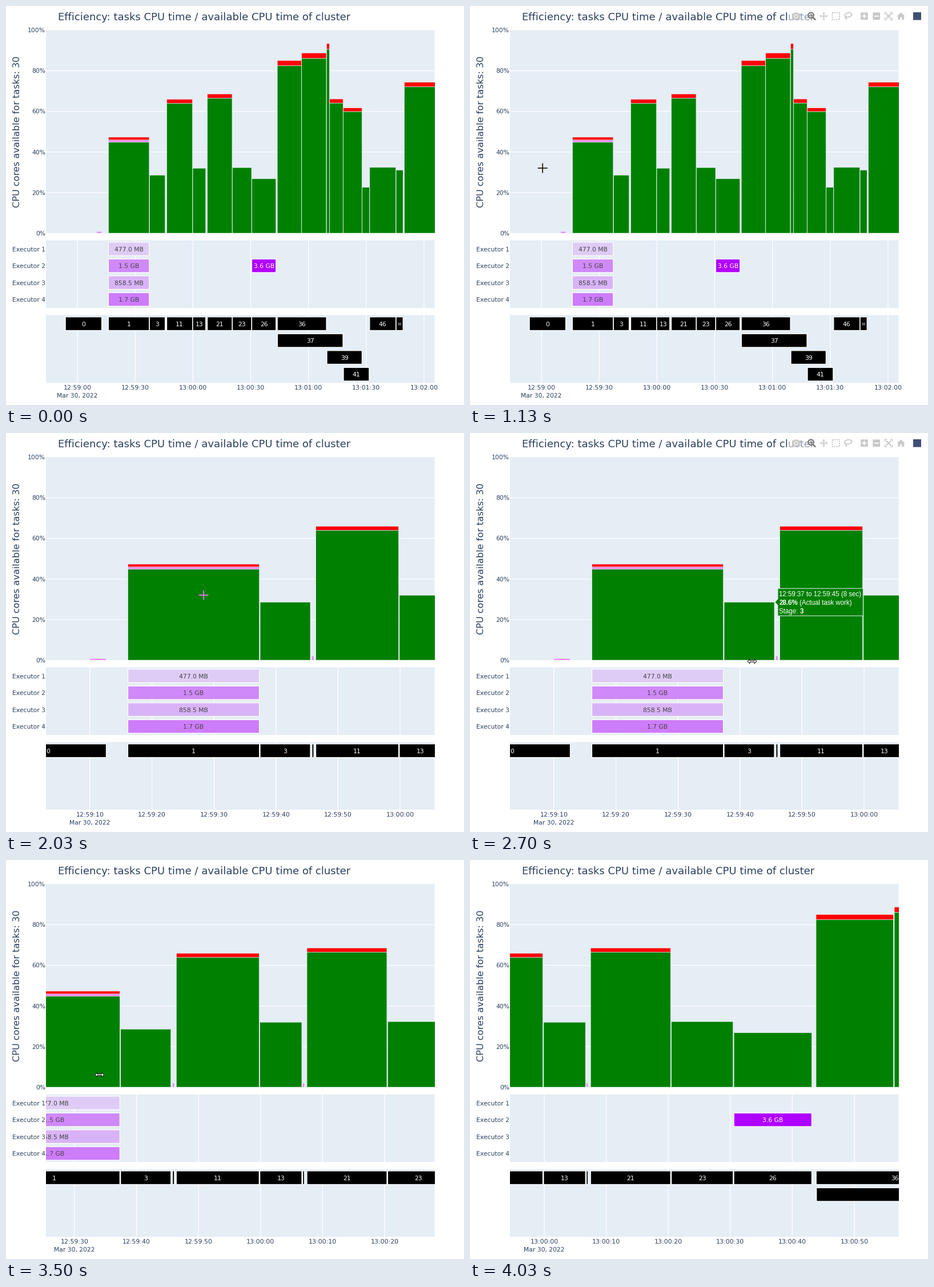
Animation of 802 by 699 pixels, one loop 5.43 s. Source, as a matplotlib script:

```python
import math

import matplotlib.pyplot as plt
import numpy as np
from matplotlib.animation import FuncAnimation
from matplotlib.collections import PolyCollection
from matplotlib.lines import Line2D
from matplotlib.patches import Circle, Ellipse, Polygon, Rectangle
from matplotlib.path import Path

W, H, DPI = 802, 699, 64
STEP, LOOP = 30, 5430
PT = 72 / DPI
INK, PANEL, GREEN, VIOLET = "#2a3f5f", "#e5edf5", "#008000", "#ee82ee"
GREY, DARK_GREY = "#c7c7c7", "#7c7c7c"
LEFT, RIGHT, TOP, BOTTOM = 70, 750.5, 42.3, 398
LOWER_PANELS = ((410.5, 529), (541.5, 660))
SELECT, RELEASE, DRAG = 1400, 1770, 3050

# Step function of the load: start in seconds after 12:59:00, percent, stage.
LOAD_STEPS = [
    (10, 0.8, None), (12.73, 0, None), (16.12, 44.8, "1"), (37.44, 28.6, "3"),
    (45.67, 0, None), (45.8, 2, "-"), (46.23, 0, None), (46.42, 64, "11"),
    (59.9, 32, "13"), (66.78, 0, None), (66.8, 2, "-"), (67.2, 0, None),
    (67.48, 66.5, "21"), (80.5, 32.3, "23"), (90.58, 26.8, "26"),
    (103.26, 0, None), (103.83, 82.5, None), (116.45, 86.1, None),
    (129.4, 90.6, None), (131, 64.1, None), (138.1, 59.9, None),
    (147.9, 22.6, None), (151.8, 32.4, "46"), (165.5, 31.1, "52"),
    (169.23, 0, None), (169.8, 72.1, None), (190, 0, None),
]
SEGMENTS = [(start, following[0] - 0.13, work, stage)
            for (start, work, stage), following in zip(LOAD_STEPS, LOAD_STEPS[1:])
            if work]
PARALLEL = [(-6.2, 12.62, "0"), (103.85, 129.3, "36"), (103.9, 137.9, "37"),
            (129.6, 147.8, "39"), (138.2, 151.5, "41")]
STAGES = sorted(PARALLEL + [(a, b, stage) for a, b, _, stage in SEGMENTS if stage])
SPANS = {stage: (a, b) for a, b, stage in STAGES}
# stage, executor, spilled gigabytes
SPILLS = [("1", 0, 0.477), ("1", 1, 1.5), ("1", 2, 0.8585), ("1", 3, 1.7),
          ("26", 1, 3.6)]
# time, x, y; the pointer eases from each to the next
POINTER = np.array([
    (620, -20, 366), (1100, 127, 284), (SELECT, 134, 283), (1680, 346, 284),
    (2080, 346, 284), (2705, 495, 400), (2860, 408, 402), (DRAG, 408, 402),
    (4023, -152, 343),
])

plt.rcParams["font.family"] = "DejaVu Sans"
fig = plt.figure(figsize=(W / DPI, H / DPI), dpi=DPI, facecolor="white")
ax = fig.add_axes((0, 0, 1, 1))
ax.set(xlim=(0, W), ylim=(H, 0), autoscale_on=False)
ax.axis("off")

live = []


def add(artist, clip=None):
    if isinstance(artist, PolyCollection):
        ax.add_collection(artist, autolim=False)
    else:
        ax.add_artist(artist)
    if clip is not None:
        artist.set_clip_path(clip)
    artist.set_snap(False)
    live.append(artist)
    return artist


def label(x, y, text, size=10.7, color=INK, clip=None, **style):
    artist = ax.text(x, y, text, fontsize=size * PT, color=color,
                     clip_on=clip is not None, **style)
    if clip is not None:
        artist.set_clip_path(clip)
    live.append(artist)


def stroke(xs, ys, color, width, **style):
    return add(Line2D(xs, ys, color=color, lw=width * PT,
                      solid_capstyle="butt", **style))


def rect(x0, y0, x1, y1, color, **style):
    return add(Rectangle((x0, y0), x1 - x0, y1 - y0, fc=color,
                         **{"lw": 0, **style}))


def corners(x0, y0, x1, y1):
    return [(x0, y0), (x1, y0), (x1, y1), (x0, y1)]


def height(percent):
    return BOTTOM - (BOTTOM - TOP) * percent / 100


def clock(seconds):
    minutes, seconds = divmod(59 * 60 + int(seconds), 60)
    return f"{12 + minutes // 60}:{minutes % 60:02d}:{seconds:02d}"


def pointer_at(t):
    k = np.clip(np.searchsorted(POINTER[:, 0], t) - 1, 0, len(POINTER) - 2)
    (t0, *start), (t1, *end) = POINTER[k], POINTER[k + 1]
    u = np.clip((t - t0) / (t1 - t0), 0, 1)
    return np.array(start) + np.subtract(end, start) * u * u * (3 - 2 * u)


def draw_backdrop():
    panels = [rect(LEFT, y0, RIGHT, y1, PANEL)
              for y0, y1 in ((TOP, BOTTOM), *LOWER_PANELS)]
    for percent in range(0, 101, 20):
        y = height(percent)
        if 0 < percent < 100:
            stroke((LEFT, RIGHT), (y, y), "white", 1.3)
        label(69, y + 3.9, f"{percent}%", ha="right")
    for row in range(4):
        label(69.3, 429.6 + 29.5 * row, f"Executor {row + 1}", ha="right")
    label(91, 24.8, "Efficiency: tasks CPU time / available CPU time of cluster", 17.96)
    label(23.9, 353, "CPU cores available for tasks: 30", 16.1,
          rotation=90, rotation_mode="anchor")
    live.clear()
    return panels


def draw_toolbar():
    mid = 17.7
    veil = rect(556, 9, 792, 27, "white")
    # camera
    rect(564, 13, 578, 23.5, GREY)
    rect(568, 11.5, 574, 13.5, GREY)
    add(Circle((571, 18), 3, fc=GREY, ec="white", lw=1.2 * PT))
    # magnifier
    add(Circle((597, 16.3), 4.8, fc="none", ec=DARK_GREY, lw=2.2 * PT))
    stroke((600.5, 605), (20, 24.5), DARK_GREY, 2.8)
    stroke((594, 600), (16.3, 16.3), DARK_GREY, 1.3)
    stroke((597, 597), (13.3, 19.3), DARK_GREY, 1.3)
    # four-way arrow
    for dx, dy in ((1, 0), (-1, 0), (0, 1), (0, -1)):
        x, y = 619.5 + 4 * dx, mid + 4 * dy
        stroke((619.5, x), (mid, y), GREY, 1.6)
        add(Polygon([(x + 3 * dx, y + 3 * dy), (x + 2.6 * dy, y + 2.6 * dx),
                     (x - 2.6 * dy, y - 2.6 * dx)], fc=GREY, lw=0))
    # box select and lasso
    add(Rectangle((634.5, 11.8), 12.6, 12, fc="none", ec=GREY, lw=1.8 * PT,
                  ls=(0, (1.2, 0.8))))
    add(Ellipse((662.3, 15.6), 12.5, 7.4, angle=-10, fc="none", ec=GREY, lw=1.7 * PT))
    stroke((657.5, 656.8, 659.5, 658.5), (18, 20.5, 21.5, 24.2), GREY, 1.6)
    # plus and minus
    for x in (690.5, 711.7):
        rect(x - 6.3, 11.4, x + 6.3, 24, GREY)
        stroke((x - 4, x + 4), (mid, mid), "white", 2)
    stroke((690.5, 690.5), (mid - 4, mid + 4), "white", 2)
    # autoscale
    for sx in (-1, 1):
        for sy in (-1, 1):
            x, y = 733 + 6.4 * sx, mid + 6.4 * sy
            stroke((x - 3.6 * sx, x, x), (y, y, y - 3.6 * sy), GREY, 1.4)
            stroke((733, 733 + 4.2 * sx), (mid, mid + 4.2 * sy), GREY, 1.9)
    # home
    add(Polygon([(747.6, 18.2), (754.7, 11.6), (761.8, 18.2)], fc=GREY, lw=0))
    rect(749.4, 18.2, 760, 23.8, GREY)
    rect(753.1, 19.8, 756.3, 23.8, "white")
    rect(776, 11, 790, 24.6, "#3f4f75")
    icons = list(live)
    live.clear()
    for icon in icons:
        icon.set_zorder(8)
    return veil, icons


main_panel, spill_panel, stage_panel = draw_backdrop()
veil, toolbar = draw_toolbar()


def draw_boxes(rects, colors, clip, edge, width):
    add(PolyCollection([corners(*r) for r in rects], facecolors=colors,
                       edgecolors=edge, linewidths=width * PT, zorder=3), clip)


def draw_loads(to_x):
    rects, colors = [], []
    for start, end, work, stage in SEGMENTS:
        spill = 1.1 if stage == "1" else 0
        overhead = 0.031 * work if work > 40 else 0
        layers = ((work, VIOLET if work < 3 else GREEN), (spill, VIOLET),
                  (overhead, "red"))
        base = 0
        for size, color in layers:
            if size:
                rects.append((to_x(start), height(base + size), to_x(end), height(base)))
                colors.append(color)
                base += size
    draw_boxes(rects, colors, main_panel, PANEL, 0.7)


def draw_tasks(to_x, tasks, first_y, clip):
    """Draw labelled boxes given as (start, end, row, text, fill, ink)."""
    rects, fills = [], []
    for start, end, row, text, fill, ink in tasks:
        x0, x1, y = to_x(start), to_x(end), first_y + 29.5 * row
        rects.append((x0, y - 11.8, x1, y + 11.8))
        fills.append(fill)
        size, x = min(10.7, (x1 - x0) / 2), (x0 + x1) / 2
        if size > 1 and LEFT - 30 < x < RIGHT + 30:
            label(x, y + 0.37 * size, text, size, ink, clip, ha="center", zorder=4)
    draw_boxes(rects, fills, clip, "white", 1.2)


def spill_tasks():
    for stage, row, size in SPILLS:
        u = (size - 0.477) / (3.6 - 0.477)
        fill = (np.array((223, 204, 246)) * (1 - u) + np.array((176, 0, 255)) * u) / 255
        text = f"{size:.1f} GB" if size >= 1 else f"{size * 1000:.1f} MB"
        yield *SPANS[stage], row, text, fill, "white" if size > 2 else "#444444"


def stage_tasks():
    """Each stage goes one row below the last, or on top when nothing is running."""
    row, busy_until = 0, -math.inf
    for start, end, stage in STAGES:
        row = row + 1 if start < busy_until else 0
        busy_until = max(busy_until, end)
        yield start, end, row, stage, "black", "white"


def draw_ticks(to_x, left, step):
    first = math.ceil(left / step) * step
    tick = first
    while to_x(tick) <= RIGHT:
        x = to_x(tick)
        for panel in LOWER_PANELS:
            stroke((x, x), panel, "white", 1.4)
        label(x, 671.6, clock(tick), 11, ha="center")
        tick += step
    label(to_x(first), 685.8, "Mar 30, 2022", ha="center")


def draw_selection(t):
    x0, x1 = pointer_at(SELECT)[0] + 0.7, pointer_at(t - 20)[0]
    shade = 0.35 * min(1, (t - SELECT) / 170)
    for a, b in ((LEFT, x0), (x1, RIGHT)):
        rect(a, TOP, b, BOTTOM, "black", alpha=shade, zorder=5)
    for x in (x0 - 1.7, x1 + 1.7):
        rect(x - 1.4, 261.5, x + 1.4, 297.5, "white", ec="#444444",
             lw=0.9 * PT, zorder=6)


def draw_hover(pointer_x, to_x):
    for start, end, percent, stage in SEGMENTS:
        if to_x(start) <= pointer_x <= to_x(end):
            break
    else:
        return
    seconds = int(end) - int(start)
    x, y = to_x(end) + 0.8, height(percent)
    x0 = x + 5.2
    x1 = x0 + 143 + 6.4 * len(str(seconds))
    add(Polygon([(x, y), (x0, y - 5.5), (x0, y - 24), (x1, y - 24),
                 (x1, y + 24), (x0, y + 24), (x0, y + 5.5)],
                fc=GREEN, ec=PANEL, lw=PT, zorder=9))
    style = dict(size=11.5, color="white", family="Liberation Sans", zorder=10)
    tx = x0 + 2.2
    label(tx, y - 10.3, f"{clock(start)} to {clock(end)} ({seconds} sec)", **style)
    label(tx, y + 4.6, f"{percent}%", weight="bold", **style)
    label(tx + 35.8, y + 4.6, "(Actual task work)", **style)
    label(tx, y + 19.4, "Stage: ", **style)
    label(tx + 36.4, y + 19.4, stage, weight="bold", **style)


def draw_cross(x, y, to_x, shaded):
    """A crosshair in the inverse colour of what lies under it."""
    def arms(color):
        return [stroke(xs, ys, color, 1.7, zorder=11)
                for xs, ys in (((x - 8.5, x + 8.5), (y, y)),
                               ((x, x), (y - 8.5, y + 8.5)))]

    arms("#68665f" if shaded else "#1a130a")
    bars = [Path(corners(to_x(a), height(top), to_x(b), BOTTOM) + [(0, 0)],
                 codes=[Path.MOVETO] + [Path.LINETO] * 3 + [Path.CLOSEPOLY])
            for a, b, top, _ in SEGMENTS if top > 3]
    over_green = Path.make_compound_path(*bars)
    for arm in arms("#ffaaff" if shaded else "#ff7fff"):
        arm.set_clip_path(over_green, ax.transData)


def draw_pointer(t, x, y, to_x):
    if y > BOTTOM or t > DRAG:
        half = [(-8, 0), (-4, -4), (-4, -1.2), (4, -1.2), (4, -4)]
        shape = half + [(-dx, -dy) for dx, dy in half]
    elif x < LEFT:
        shape = [(0, 0), (0, 16), (3.7, 12.6), (6.2, 18), (8.8, 17),
                 (6.4, 11.5), (11.3, 11.5)]
    else:
        draw_cross(x, y, to_x, SELECT < t < RELEASE)
        return
    add(Polygon(np.add(shape, (x, y)), fc="white", ec="black", lw=0.9 * PT, zorder=11))


def fade_toolbar(t):
    alpha = 0
    for k, start in enumerate((640, SELECT - 10, 2190, DRAG)):
        u = np.clip((t - start) / 300, 0, 1)
        alpha += (-1) ** k * (1 - (1 - u) ** 2)
    for icon in toolbar:
        icon.set_visible(alpha > 0.01)
        icon.set_alpha(np.clip(alpha, 0, 1) * (0.5 if icon is veil else 1))


def update(i):
    t = i * STEP + STEP / 2
    for artist in live:
        artist.remove()
    live.clear()

    x, y = pointer_at(t)
    zoomed = t >= RELEASE
    left, scale = (2.91, 10.86) if zoomed else (-16.31, 3.372)
    if t > DRAG:
        left += (pointer_at(DRAG)[0] - x) / scale

    def to_x(seconds):
        return LEFT + (seconds - left) * scale

    draw_ticks(to_x, left, 10 if zoomed else 30)
    draw_loads(to_x)
    draw_tasks(to_x, spill_tasks(), 425.6, spill_panel)
    draw_tasks(to_x, stage_tasks(), 556.6, stage_panel)
    if SELECT < t < RELEASE:
        draw_selection(t)
    if 2180 < t < 2760:
        draw_hover(x, to_x)
    fade_toolbar(t)
    draw_pointer(t, x, y, to_x)
    return live


animation = FuncAnimation(fig, update, frames=LOOP // STEP, interval=STEP,
                          repeat=True, cache_frame_data=False)
plt.show()
```
